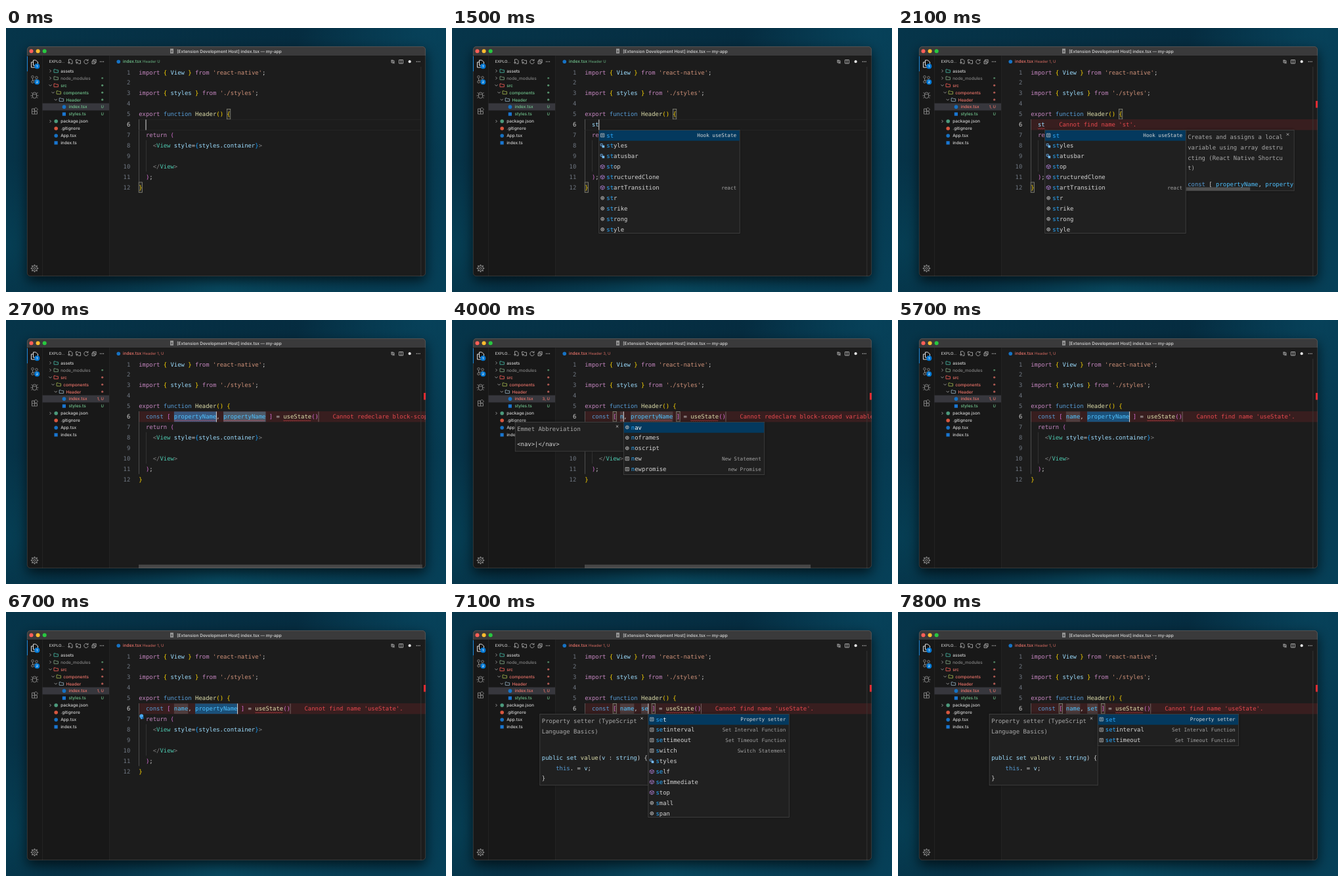
An HTML page with a canvas that plays this animation: 670x402 px, repeating every 8 s.

```html
<!DOCTYPE html>
<html lang="en">
<head>
<meta charset="utf-8">
<title>Editor snippet demo</title>
<style>
html, body { margin: 0; width: 100%; height: 100%; overflow: hidden; background: #06283a; }
canvas { display: block; width: 670px; height: 402px; }
</style>
</head>
<body>
<canvas id="stage"></canvas>
<script>
const W = 670, H = 402, LOOP = 8000;
const canvas = document.getElementById('stage');
const dpr = window.devicePixelRatio || 1;
canvas.width = W * dpr;
canvas.height = H * dpr;
const ctx = canvas.getContext('2d');
if ('textRendering' in ctx) ctx.textRendering = 'geometricPrecision';

const CH = 5.367, LH = 15.92, LEFT = 202.2;
const MONO = '8.92px "DejaVu Sans Mono", monospace';
const MONO_SMALL = '7.65px "DejaVu Sans Mono", monospace';
const ui = (size, weight = 500) => `${weight} ${size}px Inter, sans-serif`;
const colX = c => LEFT + c * CH;
const lineY = n => 67.4 + (n - 1) * LH;

const INK = {
  k: '#c586c0', b: '#569cd6', y: '#ffd700', o: '#da70d6', u: '#179fff', s: '#ce9178',
  v: '#9cdcfe', t: '#4ec9b0', f: '#dcdcaa', c: '#4fc1ff', g: '#808080', w: '#d4d4d4'
};
const GREEN = '#73c991', RED = '#f0766c';

// ---- timeline ----
const PN = 'propertyName';
// time, typed word or null, first name, second name, active slot, selected
const KEYS = [
  [-200, ''], [1300, 's'], [1500, 'st'],
  [2300, null, PN, PN, 0, true],
  [4000, null, 'n', PN, 0], [4100, null, 'na', PN, 0],
  [5400, null, 'nam', PN, 0], [5500, null, 'name', PN, 0],
  [5700, null, 'name', PN, 1, true],
  [6900, null, 'name', 's', 1], [7100, null, 'name', 'se', 1], [7300, null, 'name', 'set', 1]
];
const ERRORS = [
  [0, ''], [1900, "Cannot find name 'st'."],
  [2700, "Cannot redeclare block-scoped variable 'propertyName'."],
  [4500, "Cannot find name 'useState'."]
];
const SETTER = ['s set|Property setter', 's setinterval|Set Interval Function', 's settimeout|Set Timeout Function'];
const POPUPS = [
  [0],
  [1400, ['s st|Hook useState', 'v styles', 'v statusbar', 'f stop', 'f structuredClone',
    'f startTransition|react', 'w str', 'w strike', 'w strong', 'w style']],
  [2300],
  [4000, ['w nav', 'w noframes', 'w noscript', 's new|New Statement', 's newpromise|new Promise'], 'emmet'],
  [4200, ['w nav'], 'emmet'],
  [5400],
  [7000, [...SETTER, 's switch|Switch Statement', 'v styles', 'f self', 'f setImmediate', 'f stop', 'w small', 'w span'], 'setter'],
  [7200, [...SETTER, 'f self', 'f setImmediate', 'w section', 'w select'], 'setter'],
  [7400, SETTER, 'setter']
];
const latest = (list, t) => list.filter(e => e[0] <= t).pop();

// ---- helpers ----
function rect(x, y, w, h, fill) { ctx.fillStyle = fill; ctx.fillRect(x, y, w, h); }
function frame(x, y, w, h, color) {
  ctx.strokeStyle = color; ctx.lineWidth = 0.8; ctx.strokeRect(x, y, w, h);
}
function dot(x, y, r, fill) {
  ctx.fillStyle = fill; ctx.beginPath(); ctx.arc(x, y, r, 0, 7); ctx.fill();
}
function ring(x, y, r, color) {
  ctx.strokeStyle = color; ctx.beginPath(); ctx.arc(x, y, r, 0, 7); ctx.stroke();
}
function path(d, x, y, color, width = 0.8) {
  ctx.save(); ctx.translate(x, y);
  ctx.strokeStyle = color; ctx.lineWidth = width; ctx.stroke(new Path2D(d));
  ctx.restore();
}
function text(str, x, y, color, font, align = 'left') {
  ctx.font = font; ctx.fillStyle = color; ctx.textAlign = align;
  ctx.fillText(str, x, y);
}
// pairs of ink key and string, placed on the character grid
function code(x, y, ...parts) {
  for (let i = 0; i < parts.length; i += 2) {
    text(parts[i + 1], x, y + 3.1, INK[parts[i]] || parts[i], MONO);
    x += parts[i + 1].length * CH;
  }
}
function bracketBox(col, line) {
  const x = colX(col), y = lineY(line) - 7.6;
  rect(x, y, CH, 15.4, 'rgba(110,110,110,.15)');
  frame(x, y, CH, 15.4, '#8a8a7c');
}
function squiggle(x, y, w) {
  ctx.strokeStyle = '#d8444a'; ctx.lineWidth = 0.7; ctx.beginPath();
  for (let i = 0; i <= w; i += 1.5) ctx.lineTo(x + i, y + (i / 1.5 % 2 ? 0.6 : -0.6));
  ctx.stroke();
}

// ---- window ----
function backdrop() {
  const g = ctx.createLinearGradient(0, 0, W, H);
  g.addColorStop(0, '#06354a'); g.addColorStop(0.5, '#052c40'); g.addColorStop(1, '#064058');
  rect(0, 0, W, H, g);
  for (const [x, y, r, c] of [[330, 400, 260, '10,88,112'], [640, 0, 200, '8,74,100'], [0, 330, 130, '6,70,92']]) {
    const glow = ctx.createRadialGradient(x, y, 0, x, y, r);
    glow.addColorStop(0, `rgba(${c},.6)`); glow.addColorStop(1, `rgba(${c},0)`);
    rect(0, 0, W, H, glow);
  }
  ctx.save();
  ctx.shadowColor = 'rgba(0,0,0,.65)'; ctx.shadowBlur = 18 * dpr; ctx.shadowOffsetY = 7 * dpr;
  ctx.fillStyle = '#1c1c1c';
  ctx.beginPath(); ctx.roundRect(32, 28, 607, 350, 5); ctx.fill();
  ctx.restore();
}

function titleBar() {
  rect(32, 28, 607, 14, '#3a3a3b');
  ['#ff5f57', '#febc2e', '#28c840'].forEach((c, i) => dot(38.5 + i * 10.1, 35.2, 3, c));
  rect(250, 31.5, 5, 7.2, '#9a9a9a');
  rect(251.2, 34, 2.6, 3, '#666');
  text('[Extension Development Host] index.tsx — my-app', 340, 37.5, '#c9c9c9', ui(6.5, 600), 'center');
}

function activityBar() {
  rect(32, 42, 23.5, 336, '#181818');
  rect(32, 43, 1, 23, '#0078d4');
  const dim = '#8a8a8a';
  path('M-2 -5H2L5 -2V3H-2ZM-2 -2H-5V6H2V3', 43.5, 54, '#e0e0e0', 1);
  ctx.lineWidth = 0.9;
  ring(40.5, 74.5, 1.8, dim); ring(46.5, 75.5, 1.8, dim); ring(40.5, 82, 1.8, dim);
  path('M-3 -1.5V2M3 -.5C3 2 -1 1 -3 2', 43.5, 78, dim, 0.9);
  path('M-3 -1Q-3 -4 0 -4Q3 -4 3 -1V2Q3 5 0 5Q-3 5 -3 2ZM-3 -1H3M-3 1H-6M3 1H6M-3 -2L-5 -4M3 -2L5 -4M-3 3L-5 5M3 3L5 5', 43.5, 102, dim, 0.9);
  path('M-4 -3H0V1H4V5H-4ZM0 1V5M-4 1H0M2 -5L5 -2L2 1L-1 -2Z', 43.5, 126, dim, 0.9);
  for (const [y, n] of [[58.2, '1'], [82.2, '2']]) {
    dot(47.3, y, 4, '#0078d4');
    text(n, 47.3, y + 1.8, '#fff', ui(5, 600), 'center');
  }
  ctx.lineWidth = 1;
  ring(43.5, 366, 4, dim); ring(43.5, 366, 1.6, dim);
  for (let i = 0; i < 8; i++) {
    const a = i * Math.PI / 4, c = Math.cos(a), s = Math.sin(a);
    path(`M${c * 4} ${s * 4}L${c * 5.8} ${s * 5.8}`, 43.5, 366, dim, 1.6);
  }
}

// depth, name, chevron, icon kind, icon colour, status
const TREE = [
  [0, 'assets', '>', 'd', '#3f9f8f', ''], [0, 'node_modules', '>', 'd', '#6f8f72', 'dim'],
  [0, 'src', 'v', 'd', '#d0524c', 'dot'], [1, 'components', 'v', 'd', '#8a9a45', 'dot'],
  [2, 'Header', 'v', 'd', '#7f97a5', 'dot'], [3, 'index.tsx', '', 'c', '#1672c4', 'U'],
  [3, 'styles.ts', '', 'q', '#1976d2', 'ok'], [0, 'package.json', '>', 'c', '#4c9a7c', ''],
  [0, '.gitignore', '', 'c', '#d8573f', ''], [0, 'App.tsx', '', 'c', '#1672c4', ''],
  [0, 'index.ts', '', 'q', '#1976d2', '']
];

function sideBar(errors) {
  rect(55.5, 42, 102, 336, '#181818');
  rect(55, 42, 0.6, 336, '#2b2b2b');
  rect(157, 42, 0.6, 336, '#2b2b2b');
  text('EXPLO…', 65.5, 53.3, '#c4c4c4', ui(5.8));
  const ic = '#b8b8b8';
  path('M-2.5 0V-3.5H1L3 -1.5V3H0M-4 1.5H0M-2 -.5V3.5', 98, 51.3, ic);
  path('M-3.5 0V-3H-1L0 -2H3.5V3H0M-4 1.5H0M-2 -.5V3.5', 110, 51.3, ic);
  path('M2.5 -2A3.2 3.2 0 1 0 3.2 .5M3 -3.8V-1.5H.8', 122, 51.3, ic);
  path('M-3 -1H1.5V3.2H-3ZM-1.5 -1V-3H3.2V1.5H1.5M-2 1H.5', 134, 51.3, ic);
  for (let i = -1; i < 2; i++) dot(146 + i * 2.4, 51.3, 0.7, ic);

  rect(55.5, 114.6, 101.5, 10.9, '#37373d');
  const mark = errors ? RED : GREEN;
  TREE.forEach(([depth, name, chevron, kind, tint, status], i) => {
    const x = 67.5 + depth * 4.1, y = 65.4 + i * 10.95;
    if (chevron) path(chevron === 'v' ? 'M-2 -1L0 1L2 -1' : 'M-1 -2L1 0L-1 2', x, y, '#b0b0b0');
    if (kind === 'd') path('M-3.2 2.4V-2.4H-.8L.2 -1.4H3.2V2.4Z', x + 8.7, y, tint, 1);
    else if (kind === 'c') dot(x + 8.7, y, 2.8, tint);
    else rect(x + 6, y - 2.6, 5.2, 5.2, tint);
    const color = status === 'dim' ? '#858585' : status === 'ok' ? GREEN : status ? mark : '#d4d4d4';
    text(name, x + 15.7, y + 2.3, color, ui(6.5));
    if (status === 'dim') dot(146.7, y, 1.4, GREEN + '99');
    if (status === 'dot') dot(146.7, y, 1.6, mark + 'b0');
    if (status === 'ok') text('U', 149, y + 2.2, GREEN, ui(6), 'right');
    if (status === 'U') text(errors ? errors + ', U' : 'U', 149, y + 2.2, mark, ui(6), 'right');
  });
}

function tabBar(errors) {
  const mark = errors ? RED : GREEN;
  dot(171.3, 51.2, 2.8, '#1672c4');
  text('index.tsx', 178, 53.4, mark, ui(6.5));
  text('Header ' + (errors ? errors + ', U' : 'U'), 208, 53.4, mark + 'c0', ui(5.9));
  const ic = '#c4c4c4';
  path('M-2 -3V1.5H1M2 3V-1.5H-1M0 -3L-1.5 -1.5L0 0M0 0L1.5 1.5L0 3', 589, 51.3, ic);
  path('M-3 -2.7H3V2.7H-3ZM0 -2.7V2.7', 601.5, 51.3, ic);
  dot(614.7, 51.2, 2.1, '#e4e4e4');
  for (let i = -1; i < 2; i++) dot(627.7 + i * 2.4, 51.3, 0.7, ic);
}

// ---- editor ----
function staticCode(inBody) {
  for (let n = 1; n <= 12; n++)
    text(n, 189.3, lineY(n) + 3.1, n === 6 ? '#d0d0d0' : '#6e7681', MONO, 'right');
  rect(202, lineY(6) - LH / 2, 0.8, LH * 6, '#5a5a5a');
  rect(213, lineY(8) - LH / 2, 0.8, LH * 3, '#393939');
  if (inBody) { bracketBox(25, 5); bracketBox(0, 12); }
  const row = (n, col, ...parts) => code(colX(col), lineY(n), ...parts);
  row(1, 0, 'k', 'import ', 'y', '{ ', 'v', 'View', 'y', ' } ', 'k', 'from ', 's', "'react-native'", 'w', ';');
  row(3, 0, 'k', 'import ', 'y', '{ ', 'v', 'styles', 'y', ' } ', 'k', 'from ', 's', "'./styles'", 'w', ';');
  row(5, 0, 'k', 'export ', 'b', 'function ', 'f', 'Header', 'y', '() {');
  row(7, 2, 'k', 'return ', 'o', '(');
  row(8, 4, 'g', '<', 't', 'View ', 'v', 'style', 'w', '=', 'u', '{', 'v', 'styles.container', 'u', '}', 'g', '>');
  row(10, 4, 'g', '</', 't', 'View', 'g', '>');
  row(11, 2, 'o', ')', 'w', ';');
  row(12, 0, 'y', '}');
}

// draws line 6 and returns the column of the caret and of the line end
function activeLine(key, message) {
  const [, word, a, b, slot, selected] = key;
  const y = lineY(6), top = y - 8;
  if (message) rect(202.5, top, 436.5, 16.4, '#381e1f');
  else for (const ly of [top, top + 16]) rect(202, ly, 430, 0.7, '#292929');
  rect(202, top, 0.8, 16.4, '#5a5a5a');

  let caret, end;
  if (word !== null) {
    caret = end = 2 + word.length;
    code(colX(2), y, 'v', word);
    if (message) squiggle(colX(2), y + 6.2, word.length * CH);
  } else {
    const aCol = 10, bCol = 12 + a.length, close = bCol + b.length + 1;
    end = close + 14;
    caret = slot ? bCol + b.length : aCol + a.length;
    [[aCol, a], [bCol, b]].forEach(([col, name], i) => {
      const w = name.length * CH;
      rect(colX(col), top + 0.5, w, 15.6, 'rgba(124,124,124,.32)');
      if (selected && i === slot) rect(colX(col), top + 0.5, w, 15.6, slot ? 'rgba(18,84,132,.85)' : 'rgba(50,98,150,.75)');
      else if (selected && a === b) rect(colX(col), top + 0.5, w, 15.6, 'rgba(78,110,136,.6)');
    });
    rect(colX(end) - 0.4, top + 0.5, 0.9, 15.6, '#7c6a6a');
    if (!selected) { bracketBox(8, 6); bracketBox(close, 6); }
    code(colX(2), y, 'b', 'const ', 'o', '[ ', 'c', a, 'w', ', ', 'c', b, 'o', ' ] ', 'w', '= ', 'f', 'useState', 'o', '()');
    squiggle(colX(close + 4), y + 6.2, 8 * CH);
    if (message.includes('redeclare')) {
      squiggle(colX(aCol), y + 6.2, a.length * CH);
      squiggle(colX(bCol), y + 6.2, b.length * CH);
    }
  }
  if (message) code(colX(end + 4), y, '#e5484d', message);
  return { caret, end };
}

function scrollBars(end, shownMessage, hasError) {
  const view = 437, content = (end + 4 + shownMessage.length) * CH + 29;
  if (shownMessage && content > view) rect(202, 372.5, view * view / content, 5.5, '#474747');
  rect(631.5, 59, 0.8, 319, '#3a3a3a');
  if (hasError) rect(636, 111, 3, 10.5, '#e0262c');
}

function bulb() {
  dot(206.3, 158.5, 2.9, '#4aa8f0');
  rect(205, 160.5, 2.6, 2.6, '#4aa8f0');
  dot(208, 161.2, 1.6, '#1b70b8');
}

// ---- suggestions ----
function itemIcon(kind, x, y) {
  if (kind === 's') path('M-2.6 -2.6H2.6V2.6H-2.6ZM-1.4 -1H1.4M-1.4 .8H1.4', x, y, '#c0c0c0');
  else if (kind === 'v') {
    path('M-3 -3H0V0H-3Z', x, y, '#75beff');
    rect(x - 0.6, y - 0.6, 3.6, 3.6, '#75beff');
  } else if (kind === 'f') path('M0 -3L3 -1.5V1.5L0 3L-3 1.5V-1.5ZM-3 -1.5L0 0L3 -1.5M0 0V3', x, y, '#b180d7');
  else {
    ctx.lineWidth = 1;
    ring(x, y, 2.4, '#b8b8b8'); ring(x, y, 0.8, '#b8b8b8');
  }
}

function panel(x, y, w, h) {
  ctx.save();
  ctx.shadowColor = 'rgba(0,0,0,.4)'; ctx.shadowBlur = 5 * dpr;
  rect(x, y, w, h, '#202020');
  ctx.restore();
  frame(x, y, w, h, '#454545');
}

function docs(kind, x) {
  const grey = '#a8a8a8', top = 155.4, at = n => 165.6 + n * LH;
  const h = { hook: 92.4, emmet: 44.6, setter: 108.4 }[kind], tx = x + 3;
  panel(x, top, 165, h);
  path('M-1.7 -1.7L1.7 1.7M1.7 -1.7L-1.7 1.7', x + 155.3, 162, '#c8c8c8');
  if (kind === 'hook') {
    ['Creates and assigns a local', 'variable using array destru', 'cting (React Native Shortcu', 't)']
      .forEach((s, i) => code(tx, at(i), grey, s));
    code(tx, 237.4, 'b', 'const ', 'w', '[ ', 'c', PN, 'w', ', ', 'c', 'property');
    rect(x + 0.5, 242.5, 97.5, 5, 'rgba(130,130,130,.5)');
  } else if (kind === 'emmet') {
    code(tx, at(0), grey, 'Emmet Abbreviation');
    code(tx, 189.3, 'w', '<nav>|</nav>');
  } else {
    code(tx, at(0), grey, 'Property setter (TypeScript');
    code(tx, at(1), grey, 'Language Basics)');
    code(tx, 221.5, 'v', 'public set ', 'f', 'value', 'w', '(', 'v', 'v ', 'w', ': ', 'v', 'string', 'w', ') {');
    code(tx, 237.4, 'b', '    this', 'w', '. = ', 'v', 'v', 'w', ';');
    code(tx, 253.3, 'w', '}');
  }
}

function suggestions(t, caret, typed) {
  const [, items, help] = latest(POPUPS, t);
  if (!items) return;
  const x = colX(caret), top = 155.4, w = 214.5, h = items.length * LH + 0.6;
  const kind = help || (t >= 1700 && 'hook');
  if (kind) docs(kind, kind === 'hook' ? x + w : x - 165);
  const height = Math.min(h, 157);
  panel(x, top, w, height);
  ctx.save();
  ctx.beginPath(); ctx.rect(x, top, w, height); ctx.clip();
  rect(x + 0.4, top + 0.4, w - 0.8, LH, '#04395e');
  items.forEach((item, i) => {
    const [label, detail] = item.slice(2).split('|');
    const y = top + 8 + i * LH, n = label.startsWith(typed) ? typed.length : 1;
    itemIcon(item[0], x + 5.5, y);
    code(x + 11.6, y, '#2aaaff', label.slice(0, n), i ? 'w' : '#fff', label.slice(n));
    if (detail) text(detail, x + w - 5, y + 2.8, i ? '#a0a0a0' : '#d4d4d4', MONO_SMALL, 'right');
  });
  ctx.restore();
}

function draw(t) {
  const key = latest(KEYS, t), message = latest(ERRORS, t)[1];
  const errors = t < 1900 ? 0 : t >= 2900 && t < 4500 ? 3 : 1;
  const typing = key[1] !== null;

  ctx.setTransform(dpr, 0, 0, dpr, 0, 0);
  backdrop();
  ctx.save();
  ctx.beginPath(); ctx.roundRect(32, 28, 607, 350, 5); ctx.clip();
  titleBar();
  activityBar();
  sideBar(errors);
  tabBar(errors);
  staticCode(typing);
  const { caret, end } = activeLine(key, message);
  if (Math.floor((t - key[0]) / 500) % 2 === 0) rect(colX(caret) - 0.4, 139.4, 1, 16, '#d8d8d8');
  // the scroll width follows the message a little late
  scrollBars(end, t < 2300 ? '' : latest(ERRORS, t < 2900 ? 2300 : t)[1], errors > 0);
  if (t >= 5900 && t < 6900) bulb();
  suggestions(t, caret, typing ? key[1] : key[2 + key[4]]);
  ctx.restore();

  ctx.strokeStyle = 'rgba(255,255,255,.2)'; ctx.lineWidth = 0.7;
  ctx.beginPath(); ctx.roundRect(32.3, 28.3, 606.4, 349.4, 5); ctx.stroke();
}

const start = performance.now();
function tick() {
  draw((performance.now() - start) % LOOP);
  requestAnimationFrame(tick);
}
tick();
</script>
</body>
</html>
```
